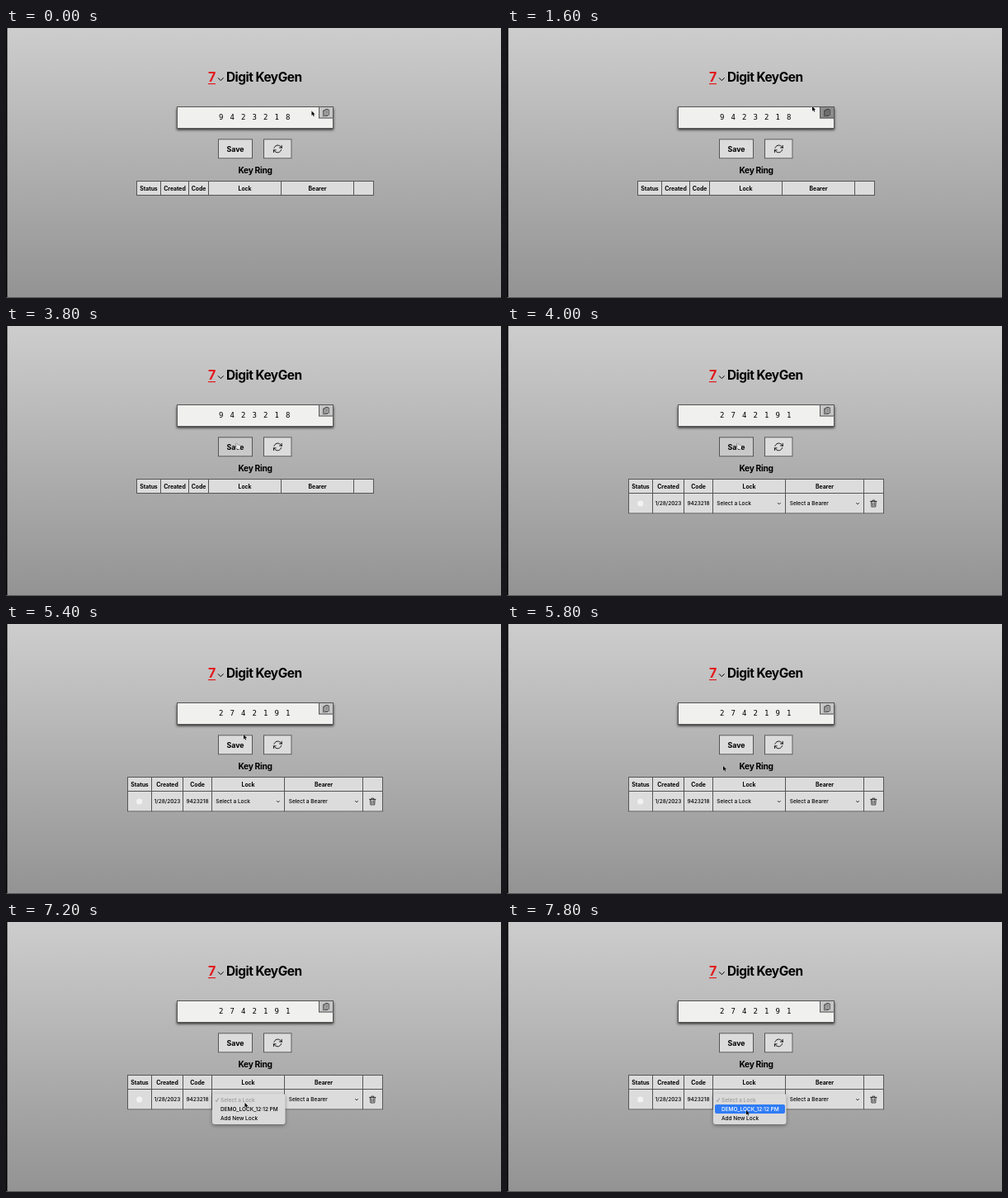
Write an HTML page with a canvas that moves like this. It is 600 px wide and 327 px high and loops after 8000 ms.

```html
<!DOCTYPE html>
<html lang="en">
<head>
<meta charset="utf-8">
<title>Digit KeyGen</title>
<style>
html, body { margin: 0; width: 100%; height: 100%; overflow: hidden; background: #aaa; }
canvas { display: block; width: 600px; height: 327px; }
</style>
</head>
<body>
<canvas id="stage"></canvas>
<script>
const W = 600, H = 327, LOOP = 8000, STEP = 200;
const canvas = document.getElementById('stage');
const ctx = canvas.getContext('2d');
const dpr = window.devicePixelRatio || 1;
canvas.width = W * dpr;
canvas.height = H * dpr;

const SANS = 'Inter, "Open Sans", sans-serif';
const MONO = '"DejaVu Sans Mono", monospace';
const INK = '#000', LINE = '#555', CELL = '#dcdcdc', RED = '#e3191c';
const SAVED = 4000, OPENED = 7200, PICKED = 7800;

// pointer path: time, x, y
const path = [
  [0, 370.5, 100.5], [600, 370.5, 100.5], [1000, 386, 101], [1200, 387, 102],
  [1600, 370, 95], [2000, 340, 102], [2400, 308, 126], [2800, 295, 134.5],
  [3400, 282, 141], [3800, 278.5, 142], [4800, 278.5, 142], [5400, 288, 134],
  [5600, 276, 150], [5800, 262, 172], [6000, 262, 172], [6400, 173, 210],
  [6600, 216, 208], [7000, 283, 214], [7200, 289.5, 219], [7600, 289.5, 219],
  [7800, 290, 228], [8000, 290, 228]
];

const refreshIcon = new Path2D('M16 9.35h5M3 19.64v-5h5m-5 0l3.18 3.19a8.25 8.25 0 0 0 13.8-3.7M4.03 9.87a8.25 8.25 0 0 1 13.8-3.7l3.18 3.18m0-5v5');
const copyIcon = new Path2D('M8 7H4v15h11v-3M8 5h12v14H8zM11 5V3h6v2M11 10h6M11 14h6');
const trashIcon = new Path2D('M3.5 6h17M9 6V3h6v3M5.5 6l1 15h11l1-15M9.5 9.5l.4 8M14.5 9.5l-.4 8');
const arrow = new Path2D('M0 0V6.2L1.5 4.9L2.6 7.3L3.6 6.8L2.6 4.5H4.5Z');
const hand = new Path2D('M.2 .8Q1 -.3 1.8 .8L2.6 2.6Q3.4 2 4 2.6Q4.8 2.2 5.3 3Q6.2 3 6.3 4.2L6 7L5.2 8.3H2.4L-.3 5.6Q-.4 4.5 .9 4.9Z');

function pointerAt(t) {
  const i = Math.max(1, path.findIndex(p => p[0] >= t));
  const [t0, x0, y0] = path[i - 1], [t1, x1, y1] = path[i];
  const k = (t - t0) / (t1 - t0);
  return [x0 + (x1 - x0) * k, y0 + (y1 - y0) * k];
}

function text(str, x, y, size, { weight = 500, color = INK, align = 'left', font = SANS, track = 0 } = {}) {
  ctx.font = `${weight} ${size}px ${font}`;
  ctx.letterSpacing = track * size + 'px';
  ctx.textAlign = align;
  ctx.fillStyle = color;
  ctx.fillText(str, x, y);
}

function box(x, y, w, h, fill) {
  ctx.fillStyle = fill;
  ctx.fillRect(x, y, w, h);
  ctx.strokeStyle = LINE;
  ctx.lineWidth = 1;
  ctx.strokeRect(x + .5, y + .5, w - 1, h - 1);
}

function stroke(shape, x, y, scale, width, color = INK) {
  ctx.save();
  ctx.translate(x, y);
  ctx.scale(scale, scale);
  ctx.translate(-12, -12);
  ctx.lineWidth = width / scale;
  ctx.lineJoin = ctx.lineCap = 'round';
  ctx.strokeStyle = color;
  ctx.stroke(shape);
  ctx.restore();
}

function chevron(x, y, r, width) {
  ctx.beginPath();
  ctx.moveTo(x - r, y - r / 2);
  ctx.lineTo(x, y + r / 2);
  ctx.lineTo(x + r, y - r / 2);
  ctx.lineWidth = width;
  ctx.strokeStyle = INK;
  ctx.stroke();
}

function rounded(x, y, w, h, r, fill) {
  ctx.beginPath();
  ctx.roundRect(x, y, w, h, r);
  ctx.fillStyle = fill;
  ctx.fill();
}

function shadow(color, blur, dy) {
  ctx.shadowColor = color;
  ctx.shadowBlur = blur * dpr;
  ctx.shadowOffsetY = dy * dpr;
}

function backdrop() {
  const g = ctx.createLinearGradient(0, 0, 0, H);
  g.addColorStop(0, '#cdcdcd');
  g.addColorStop(1, '#939393');
  ctx.fillStyle = g;
  ctx.fillRect(0, 0, W, H);
  ctx.fillStyle = '#000';
  ctx.fillRect(0, 0, 1.5, H);
  ctx.fillStyle = '#555';
  ctx.fillRect(0, H - 1, W, 1);
}

function heading() {
  text('7', 245, 65.4, 16, { weight: 700, color: RED });
  ctx.fillStyle = RED;
  ctx.fillRect(245, 67, 9, 1.2);
  chevron(260.3, 62, 3.3, 1);
  text('Digit KeyGen', 267, 65.4, 15.4, { weight: 700, track: -.032 });
}

function codeBox(code, copyFill) {
  ctx.save();
  shadow('rgba(0,0,0,.75)', 3, 1.5);
  ctx.fillStyle = '#f0f0ef';
  ctx.fillRect(207, 95, 190, 27);
  ctx.restore();
  box(207, 95, 190, 27, '#f0f0ef');
  [...code].forEach((d, i) => text(d, 260.6 + i * 13.5, 111, 9, { weight: 400, font: MONO, align: 'center' }));
  box(379, 95, 18, 14.5, copyFill);
  stroke(copyIcon, 388, 102.3, .44, .6, '#222');
}

function buttons(hover) {
  box(257, 134.3, 42, 24, hover ? '#c9c9c9' : CELL);
  text('Save', 278, 149.7, 8.8, { weight: 700, align: 'center' });
  box(312, 134.3, 34.5, 24, CELL);
  stroke(refreshIcon, 329.3, 146.4, .54, .9);
}

function table(saved) {
  const cols = saved ? [147, 176, 214, 249, 337, 432, 456] : [158, 187, 221, 245, 333, 421, 445];
  const names = ['Status', 'Created', 'Code', 'Lock', 'Bearer', ''];
  text('Key Ring', 302, 175.6, 10.2, { weight: 700, align: 'center', track: -.03 });
  names.forEach((name, i) => {
    const x = cols[i], w = cols[i + 1] - x + 1;
    box(x, 185, w, 18, CELL);
    if (saved) box(x, 202, w, 25.4, CELL);
    text(name, x + w / 2, 196.9, 6.9, { weight: 700, align: 'center', track: -.01 });
  });
  if (!saved) return;
  ctx.beginPath();
  ctx.arc(161.7, 215, 3.6, 0, Math.PI * 2);
  ctx.fillStyle = '#f2f2f2';
  ctx.fill();
  text('1/28/2023', 195.5, 217.4, 6.5, { align: 'center' });
  text('9423218', 232, 217.4, 6.5, { align: 'center' });
  text('Select a Lock', 254.3, 217.4, 6.5);
  text('Select a Bearer', 342.7, 217.4, 6.5);
  chevron(329.8, 215, 1.8, .8);
  chevron(425, 215, 1.8, .8);
  stroke(trashIcon, 444.3, 215, .44, .7);
}

function menu(picked) {
  ctx.save();
  shadow('rgba(0,0,0,.4)', 4, 1.5);
  rounded(250, 208, 88.5, 37, 3, '#dadada');
  ctx.restore();
  if (picked) rounded(252, 221, 85, 11, 2, '#2f7cf6');
  ctx.beginPath();
  ctx.moveTo(254, 215.8);
  ctx.lineTo(255.3, 217.6);
  ctx.lineTo(257.6, 213.2);
  ctx.lineWidth = .8;
  ctx.strokeStyle = '#888';
  ctx.stroke();
  text('Select a Lock', 260, 217.8, 6.5, { color: '#999' });
  text('DEMO_LOCK_12:12 PM', 260, 228.8, 6.5, { color: picked ? '#fff' : INK });
  text('Add New Lock', 260, 239.8, 6.5);
}

function pointer(x, y, isHand) {
  ctx.save();
  ctx.translate(x, y);
  ctx.scale(.88, .88);
  ctx.lineJoin = 'round';
  ctx.lineWidth = .7;
  ctx.strokeStyle = isHand ? '#333' : '#ddd';
  ctx.fillStyle = isHand ? '#e4e4e4' : '#000';
  const shape = isHand ? hand : arrow;
  ctx.stroke(shape);
  ctx.fill(shape);
  ctx.restore();
}

function draw(t) {
  const saved = t >= SAVED;
  const [x, y] = pointerAt(t);
  const onSave = x >= 257 && x <= 299 && y >= 134.4 && y <= 158;
  const onCopy = x >= 379 && x <= 397 && y >= 95 && y <= 110;
  const copied = t >= 1000 && t < 1800;
  ctx.setTransform(dpr, 0, 0, dpr, 0, 0);
  backdrop();
  heading();
  codeBox(saved ? '2742191' : '9423218', copied ? '#8c8c8c' : '#c6c6c6');
  buttons(onSave);
  table(saved);
  if (t >= OPENED) menu(t >= PICKED);
  pointer(x, y, onSave || onCopy);
}

function frame(now) {
  draw(Math.floor((now % LOOP) / STEP) * STEP);
  requestAnimationFrame(frame);
}
requestAnimationFrame(frame);
</script>
</body>
</html>
```
